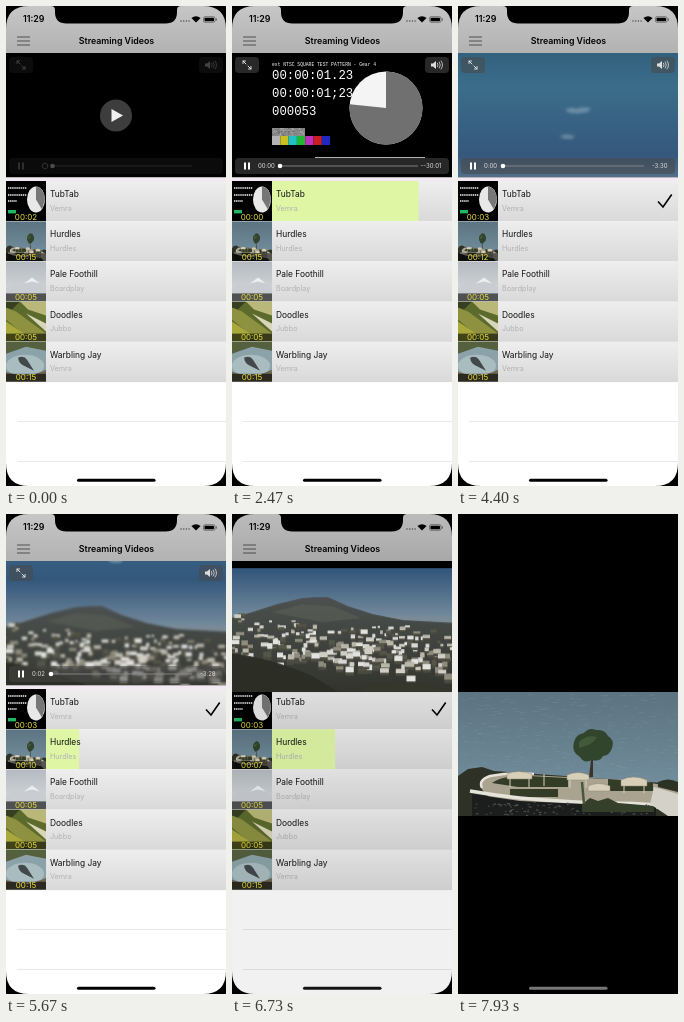
An HTML page that plays this animation: 220 px wide and 480 px high, repeating every 8 s.

```html
<!DOCTYPE html>
<html lang="en">
<head>
<meta charset="utf-8">
<title>Streaming Videos</title>
<style>
html, body { margin: 0; width: 100%; height: 100%; overflow: hidden; background: #000; }
svg { display: block; }
text { font-family: Inter, Roboto, sans-serif; white-space: pre; }
.mono text { font-family: "Liberation Mono", "DejaVu Sans Mono", monospace; font-size: 12.3px; fill: #fff; }
.mono .tiny { font-size: 4.7px; }
.title { font-size: 8.4px; fill: #111; }
.sub { font-size: 7.2px; fill: #b2b2b6; }
.left { font-size: 8px; fill: #eadf3c; text-anchor: middle; }
.clock { font-size: 6px; fill: #ddd; }
.pane { fill: rgba(72, 72, 72, .55); }
.line { fill: none; stroke: #ddd; stroke-linecap: round; }

.run { animation: 8s linear infinite; }
#bar0 { animation-name: load0; transform-origin: 40px 0; }
#bar1 { animation-name: load1; transform-origin: 40px 0; }
#check { animation-name: check; }
#play { animation-name: play; }
#controls { animation-name: controls; }
#pattern { animation-name: pattern; }
#town { animation-name: town; }
#pan { animation-name: pan; }
#cove { animation-name: cove; }
#film { animation-name: drop; }
#shade { animation-name: shade; }
#home { animation-name: home; }
#spin { animation: turn 1s linear infinite; transform-origin: 39px 160px; }

@keyframes load0 {
  0%, 5.96% { transform: scaleX(0); opacity: 1; }
  36.6% { transform: scaleX(1); opacity: 1; }
  37.5%, 100% { transform: scaleX(1); opacity: 0; }
}
@keyframes load1 {
  0%, 56.3% { transform: scaleX(0); }
  100% { transform: scaleX(.55); }
}
@keyframes check { 0%, 37.5% { opacity: 0; } 37.51%, 100% { opacity: 1; } }
@keyframes play { 0%, .8% { opacity: 1; } 3.3%, 100% { opacity: 0; } }
@keyframes controls { 0% { opacity: .3; } 5%, 81.5% { opacity: 1; } 83%, 100% { opacity: 0; } }
@keyframes pattern { 0%, 8.78% { opacity: 0; } 8.79%, 44.99% { opacity: 1; } 45%, 100% { opacity: 0; } }
@keyframes town { 0%, 45% { opacity: 0; } 50%, 90.8% { opacity: 1; } 90.81%, 100% { opacity: 0; } }
@keyframes pan {
  0%, 45% { transform: translateY(135px); filter: blur(1.6px); }
  55% { transform: translateY(100px); filter: blur(1.6px); }
  70.9% { transform: translateY(16px); filter: blur(1.3px); }
  80% { filter: blur(.2px); }
  84%, 100% { transform: none; filter: blur(.2px); }
}
@keyframes cove { 0%, 90.8% { opacity: 0; } 90.81%, 100% { opacity: 1; } }
@keyframes drop {
  0%, 83.1% { transform: none; animation-timing-function: ease-in-out; }
  89.4%, 100% { transform: translateY(131px); }
}
@keyframes shade {
  0%, 83.1% { opacity: 0; animation-timing-function: ease-in-out; }
  89.4%, 100% { opacity: 1; }
}
@keyframes home { 0%, 83.1% { fill: #000; } 89.4%, 100% { fill: #777; } }
@keyframes turn { to { transform: rotate(360deg); } }
</style>
</head>
<body>
<svg width="220" height="480" viewBox="0 0 220 480">
  <defs>
    <linearGradient id="nav" x2="0" y2="1"><stop stop-color="#c6c6c6"/><stop offset="1" stop-color="#b2b2b2"/></linearGradient>
    <linearGradient id="cell" x2="0" y2="1"><stop stop-color="#eeeeee"/><stop offset="1" stop-color="#d9d9d9"/></linearGradient>
    <linearGradient id="sky" x2="0" y2="1">
      <stop stop-color="#24506a"/><stop offset=".4" stop-color="#3b6d8a"/>
      <stop offset=".72" stop-color="#34587c"/><stop offset="1" stop-color="#8799a6"/>
    </linearGradient>
    <linearGradient id="sea" x2="0" y2="1"><stop stop-color="#5c7381"/><stop offset=".7" stop-color="#6f8a99"/></linearGradient>
    <linearGradient id="mist" x2="0" y2="1"><stop stop-color="#b4bac0"/><stop offset="1" stop-color="#dcdee0"/></linearGradient>
    <linearGradient id="slope" x2="0" y2="1"><stop stop-color="#4c5150"/><stop offset="1" stop-color="#2f3028"/></linearGradient>

    <g id="terrace">
      <rect width="220" height="124" fill="url(#sea)"/>
      <g id="ripples" fill="#9db2bd" opacity=".22"></g>
      <path d="M0 84l10-7 14-2 12 4 184 13v32H0z" fill="#2d3126"/>
      <path d="M22 90q8-8 28-8l60 3 60 3q30 2 50 11v18H60q-38-10-38-27z" fill="#a9a390"/>
      <path d="M34 91q10-8 36-7l40 2v9H60zM150 87l45 4v8h-45zM52 97h48v8H52z" fill="#333c26"/>
      <path d="M12 99q30 5 50 7 60 5 86 5 30 0 50 2" fill="none" stroke="#e6e3da" stroke-width="3.5"/>
      <path d="M24 96q-4-8 8-12 20-4 44-2" fill="none" stroke="#e6e3da" stroke-width="2.5"/>
      <path d="M14 102l48 7 86 4 50 2v9H14z" fill="#1c1e1d"/>
      <g id="stones" fill="#4d5150"></g>
      <path d="M124 112l8-6 8 3 10-3 10 5 36 3v6h-72z" fill="#34402a"/>
      <path d="M196 95l24 7v22h-10l-18-12z" fill="#d4d1c8"/>
      <path d="M200 90q10-5 20 0v10l-20-5z" fill="#2c3325"/>
      <path d="M133 68l-2 17h4l0-17z" fill="#3a3428"/>
      <path d="M116 50q2-8 10-9 5-6 12-3 9-1 12 6 7 4 4 12-2 7-9 8-3 6-11 4-8 4-12-3-9-5-6-15z" fill="#31442c"/>
      <path d="M121 50q8-8 18-5-4 8-18 11z" fill="#435a38"/>
      <path d="M124 90l2 22" stroke="#49573a" stroke-width="2.5"/>
      <g fill="#d8cfb8" stroke="#8c8573" stroke-width=".5">
        <path d="M49 82q11-5 25 0v5H49zM109 83q11-5 22 0v5h-22zM130 94q10-5 22 0v5h-22zM163 88q12-6 26 0v6h-26z"/>
        <path d="M52 87v8M71 87v8M112 88v8M128 88v8M166 94v7M186 94v7M86 82v12" fill="none" stroke="#d8cfb8" stroke-width="1"/>
      </g>
    </g>
  </defs>

  <rect width="220" height="480" fill="#fff"/>
  <rect width="220" height="47" fill="url(#nav)"/>
  <text x="17" y="16" font-size="8.8" font-weight="600">11:29</text>
  <g fill="#555">
    <circle cx="175" cy="15" r=".8"/><circle cx="177.7" cy="15" r=".8"/><circle cx="180.4" cy="15" r=".8"/><circle cx="183.1" cy="15" r=".8"/>
  </g>
  <path d="M190 16.4l-4.6-4.4q4.6-3.6 9.2 0z"/>
  <rect x="197.5" y="10.7" width="11.5" height="5.6" rx="1.5" fill="none" stroke="#444" stroke-width=".6"/>
  <rect x="198.5" y="11.7" width="9.5" height="3.6" rx=".7"/>
  <rect x="209.8" y="12.3" width=".8" height="2.4" fill="#444"/>
  <path d="M11 31h13M11 35h13M11 39h13" stroke="#444" stroke-width=".9"/>
  <text x="110.5" y="38.3" font-size="8.8" font-weight="600" text-anchor="middle">Streaming Videos</text>
  <rect y="47" width="220" height="124.5"/>
  <rect y="171.5" width="220" height="3.5" fill="#f2e9f2"/>
  <g id="list"></g>
  <path id="check" class="run" d="M200 195.5l5 5.5 8.7-12.5" fill="none" stroke="#000" stroke-width="1.6"/>
  <path d="M11 415.5h209M11 455.5h209" stroke="#e4e4e6" stroke-width=".8"/>

  <rect id="shade" class="run" width="220" height="480"/>
  <g id="film" class="run">
    <svg y="47" width="220" height="124">
      <rect width="220" height="124"/>
      <g id="pattern" class="run mono">
        <text class="tiny" x="40" y="13">ext NTSC SQUARE TEST PATTERN - Gear 4</text>
        <text id="code1" x="40" y="26"></text>
        <text id="code2" x="40" y="44"></text>
        <text id="count" x="40" y="62"></text>
        <rect x="40" y="75" width="33" height="8" fill="#8a8a8a"/>
        <g id="specks"></g>
        <g id="swatches"></g>
        <circle cx="154" cy="55" r="36.5" fill="#f4f4f4"/>
        <circle id="pie" cx="154" cy="55" r="18.25" fill="none" stroke="#707070" stroke-width="36.5" pathLength="30" transform="rotate(-90 154 55)"/>
        <path d="M83 104.5h110" stroke="#ddd" stroke-width=".8"/>
      </g>
      <g id="town" class="run">
        <g id="pan" class="run">
          <rect x="-8" y="-150" width="236" height="212" fill="url(#sky)"/>
          <g fill="#9db8c6" opacity=".5">
            <path d="M107-43q6-4 11-1 6-3 14-1 2 4-8 5-12 2-17-3z"/>
            <path d="M102-17q7-3 14 0 2 3-6 3-7 0-8-3z"/>
          </g>
          <path d="M110 50q40-4 118-1v20H110z" fill="#7a8b97"/>
          <path d="M-8 52l28-8 25-8 25-6 14-1 12 0 20 9 25 8 30 6 57 3v80H-8z" fill="url(#slope)"/>
          <path d="M40 44l30-8 30 2 30 12-40 4z" fill="#5d5f58" opacity=".6"/>
          <g id="houses"></g>
          <path d="M-8 84q50 6 88 24l40 24H-8z" fill="#2c2e25"/>
          <path d="M100 140l40-24 40-2 48 10v16z" fill="#35362c"/>
        </g>
      </g>
      <use id="cove" class="run" href="#terrace"/>
    </svg>
  </g>

  <g id="controls" class="run">
    <rect class="pane" x="3" y="51" width="24" height="16" rx="4"/>
    <path class="line" d="M14 58l-3-3m0 2.5V55h2.5M16 60l3 3m0-2.5V63h-2.5"/>
    <rect class="pane" x="193" y="51" width="24" height="16" rx="4"/>
    <path d="M199 57.5h2l3-2.5v8l-3-2.5h-2z" fill="#ddd"/>
    <path class="line" stroke-width=".8" d="M205.5 57.2q1.3 1.8 0 3.6M207.3 56q2.2 3 0 6M209.1 55q3 4 0 8"/>
    <rect class="pane" x="3" y="152" width="214" height="16" rx="4"/>
    <path id="pause" d="M12 156.5h2v7h-2zM16 156.5h2v7h-2z" fill="#fff"/>
    <text id="now" class="clock" x="26" y="162.2"></text>
    <circle id="spin" class="line" cx="39" cy="160" r="2.7" stroke-dasharray="1 1.1"/>
    <path d="M46 160h140" stroke="#8a8a8a" stroke-width="1.4" opacity=".6"/>
    <circle id="knob" cy="160" r="2.3" fill="#fff"/>
    <text id="rest" class="clock" x="209.5" y="162.2" text-anchor="end"></text>
  </g>
  <g id="play" class="run">
    <circle cx="110" cy="109.5" r="16" fill="#3d3d3d"/>
    <path d="M105.5 103l11.5 6.5-11.5 6.5z" fill="#f0f0f0"/>
  </g>

  <path d="M0 0h220v480H0zM23 0Q0 0 0 23V457Q0 480 23 480H197Q220 480 220 457V23Q220 0 197 0z" fill-rule="evenodd"/>
  <path d="M45 0q4 0 4 4v2q0 11.5 11.5 11.5h99Q171 17.5 171 6V4q0-4 4-4z"/>
  <rect id="home" class="run" x="71" y="472.8" width="78.5" height="3" rx="1.5"/>
</svg>

<script>
const LOOP = 8000, START = 703, SECOND = 3600;
const $ = id => document.getElementById(id);
const pad = (n, size = 2) => String(n).padStart(size, '0');

let seed = 11;
const rnd = (a = 0, b = 1) => {
  seed = (seed * 16807) % 2147483647;
  return a + (b - a) * seed / 2147483647;
};
const pick = list => list[Math.floor(rnd(0, list.length))];
const rect = (x, y, w, h, fill) =>
  `<rect x="${x.toFixed(1)}" y="${y.toFixed(1)}" width="${w.toFixed(1)}" height="${h.toFixed(1)}"${fill ? ` fill="${fill}"` : ''}/>`;
const fill = (id, n, make) => { $(id).innerHTML = Array.from({ length: n }, (_, i) => make(i)).join(''); };

// Scenery
fill('ripples', 260, () => rect(rnd(0, 220), rnd(2, 86), rnd(2, 7), .6));
fill('stones', 90, () => rect(rnd(16, 190), rnd(110, 123), rnd(1, 3), rnd(.6, 1.4)));
fill('specks', 60, () => rect(rnd(40, 72), rnd(75, 82), 1, 1, pick(['#bbb', '#666'])));
const bars = ['#b4b4b4', '#c8c020', '#20c0c8', '#20b830', '#c030c0', '#c82020', '#2028c0'];
fill('swatches', 7, i => rect(40 + i * 8.3, 83, 8.3, 9, bars[i]));
fill('houses', 230, i => {
  const x = rnd(-4, 222), y = 46 + i * .17 + x * .09 + rnd(-6, 8);
  const w = rnd(2, 7) + i * .012, h = rnd(1.5, 4) + i * .01;
  return rect(x, y + h * .6, w, h, '#4b4a40') + rect(x, y, w, h, pick(['#e2e2de', '#cfcdc4', '#b9b6aa', '#8f8c7e', '#d8d8d6', '#55564a']));
});

// List
const thumbs = [
  `<rect width="40" height="40"/><path d="M2 7h19M2 14h19M2 20h9" stroke="#bbb" stroke-width="1.8" stroke-dasharray="1.4 .7"/>
   <ellipse cx="30" cy="18.5" rx="9" ry="13" fill="#e8e8e8"/><path d="M30 18.5V5.5q8 1 9 13l-3 10z" fill="#777"/>
   <path d="M2 31h8" stroke="#20b860" stroke-width="4"/>`,
  `<use href="#terrace" transform="scale(.1818 .323)"/>`,
  `<rect width="40" height="40" fill="url(#mist)"/><path d="M0 27l9-7 7 4 10-8 14 10v14H0z" fill="#c9ccd0"/><path d="M18 22l8-6 8 6-8-2z" fill="#eceef0"/>`,
  `<rect width="40" height="40" fill="#5c6a2c"/><path d="M14 0h26v14L22 8z" fill="#b9b878"/><path d="M0 6l10 4 30 22v8H26L0 18z" fill="#8d9140"/>
   <path d="M20 12l20 10v8z" fill="#d9d5b8"/><path d="M0 0h14L6 8 0 6z" fill="#373f22"/><path d="M0 20l18 12-4 8H0z" fill="#a9a83c"/>`,
  `<rect width="40" height="40" fill="#8ba3a8"/><path d="M0 0h40v9L20 5 0 12z" fill="#55603f"/><ellipse cx="19" cy="24" rx="19" ry="11" fill="#a9bcc0"/>
   <path d="M12 16q6-3 9 2l7 11-10-5q-5-2-6-8z" fill="#43494a"/><path d="M0 30q20 8 40-2v12H0z" fill="#6f6653"/>`
];
const rows = [
  ['TubTab', 'Vemra', '00:02'], ['Hurdles', 'Hurdles', '00:15'], ['Pale Foothill', 'Boardplay', '00:05'],
  ['Doodles', 'Jubbo', '00:05'], ['Warbling Jay', 'Vemra', '00:15']
];
fill('list', rows.length, i => {
  const [title, sub, left] = rows[i];
  return `<g transform="translate(0 ${175 + i * 40.2})">
    <rect width="220" height="40.3" fill="url(#cell)"/>
    ${i < 2 ? `<rect id="bar${i}" class="run" x="40" width="180" height="40" fill="#dff7a4"/>` : ''}
    <svg width="40" height="40">${thumbs[i]}<rect y="32" width="40" height="8" opacity=".6"/></svg>
    <text id="left${i}" class="left" x="20" y="38.6">${left}</text>
    <text class="title" x="44" y="16">${title}</text><text class="sub" x="44" y="29.6">${sub}</text>
  </g>`;
});

const put = (id, s) => { const el = $(id); if (el.textContent !== s) el.textContent = s; };

function draw(t) {
  const n = Math.max(0, Math.min(69, Math.round((t - START) / 1000 * 30)));
  const sec = pad(Math.floor(n / 30)), sub = pad(n % 30);
  put('code1', `00:00:${sec}.${sub}`);
  put('code2', `00:00:${sec};${sub}`);
  put('count', pad(n, 6));
  $('pie').setAttribute('stroke-dasharray', `${n % 30} 30`);

  put('left0', '00:' + pad(t < 3000 ? 2 - Math.floor(t / 1000) : 3));
  put('left1', '00:' + pad(15 - Math.max(0, Math.floor((t - 2600) / 515))));

  const second = t >= SECOND;
  const busy = t < START || (t >= 3000 && !second);
  const s = Math.floor((t - SECOND) / 1000);
  put('now', busy ? '' : second ? `0:${pad(s)}` : '00:00');
  put('rest', second ? `-3:${pad(30 - s)}` : t < START ? '' : '--30:01');
  $('spin').style.opacity = busy ? 1 : 0;
  $('pause').style.opacity = busy ? .55 : 1;
  $('knob').setAttribute('cx', second ? 45 : busy ? 46.5 : 48);
}

let t0;
function tick(now) {
  t0 ??= now;
  draw((now - t0) % LOOP);
  requestAnimationFrame(tick);
}
draw(0);
requestAnimationFrame(tick);
</script>
</body>
</html>
```
